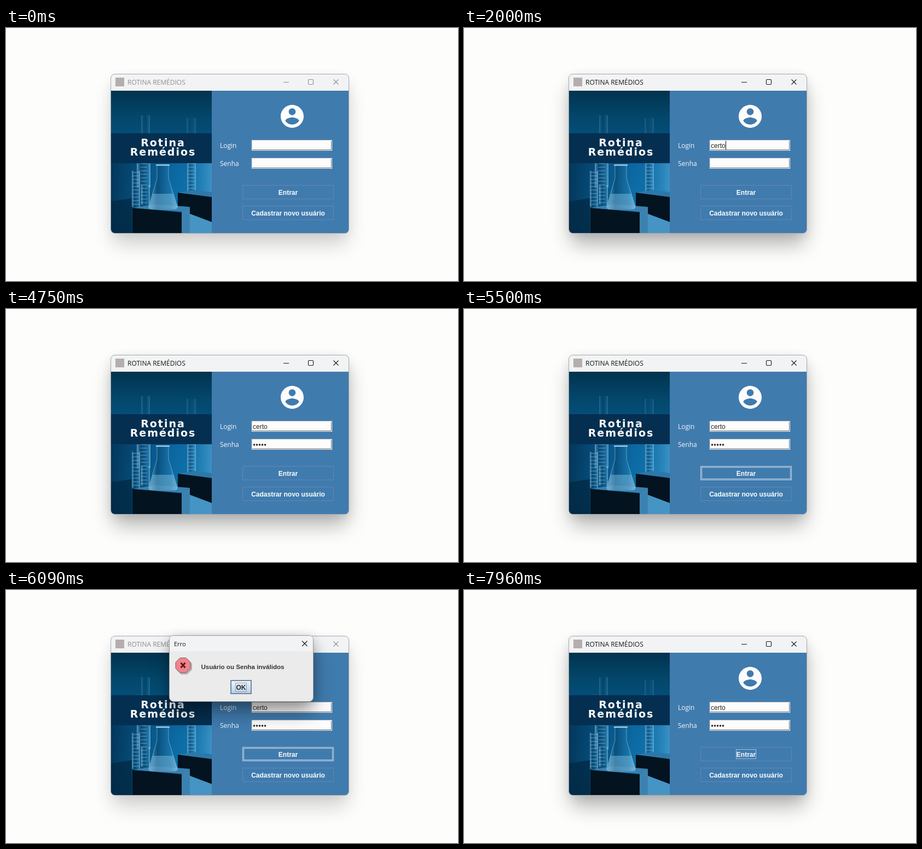
These frames come from a looping animation (826 px wide and 464 px high, 8 s). An HTML page:

```html
<!DOCTYPE html>
<html lang="pt-BR">
<head>
<meta charset="utf-8">
<title>Login</title>
<style>
html, body { margin: 0; width: 100%; height: 100%; overflow: hidden; background: #fdfdfc; }
svg { display: block; width: 100%; height: 100%; }
.ui { font: 12px "Open Sans", "Noto Sans", sans-serif; }
.field { font: 12px "Liberation Sans", Arial, sans-serif; fill: #262626; }
.bold { font: bold 12px "Liberation Sans", Arial, sans-serif; text-anchor: middle; }
.brand { font: bold 19px "DejaVu Sans", sans-serif; letter-spacing: 2px; text-anchor: middle; fill: #fdfdfd; }
.line { fill: none; stroke: currentColor; stroke-width: 1.1; }
.blur { filter: blur(18px); }
.near { filter: blur(10px); }

/* one shared 8 s timeline */
.chrome, .shade, .typed, .secret, .in-login, .in-senha, .hover, .focus, .dialog, .pressed {
  animation: 8s step-end infinite;
}
.chrome { animation-name: chrome; }
.shade { animation-name: shade; animation-timing-function: linear; }
.typed { animation-name: typed; }
.secret { animation-name: secret; }
.in-login { animation-name: in-login; }
.in-senha { animation-name: in-senha; }
.hover { animation-name: hover; }
.focus { animation-name: focus; }
.pressed { animation-name: pressed; }
.dialog { animation-name: dialog; animation-timing-function: linear; transform-origin: 368px 118.6px; }
.caret { fill: #111; animation: blink 1s step-end infinite; }

@keyframes chrome {
  0%, 70.6% { color: #8e8e8e; }
  5%, 89.6% { color: #161616; }
  100% { color: #161616; }
}
@keyframes shade {
  0%, 5%, 72%, 89.6% { opacity: .62; }
  6.5%, 70.6%, 91%, 100% { opacity: 1; }
}
@keyframes typed {
  0% { transform: none; }
  13.5% { transform: translateX(6px); }
  15.5% { transform: translateX(12.7px); }
  17.5% { transform: translateX(16.7px); }
  19.5% { transform: translateX(20px); }
  21.5%, 100% { transform: translateX(27px); }
}
@keyframes secret {
  0% { transform: none; }
  47.5% { transform: translateX(5px); }
  49.5% { transform: translateX(10px); }
  51.5% { transform: translateX(15px); }
  53.5% { transform: translateX(20px); }
  55.5%, 100% { transform: translateX(25px); }
}
@keyframes in-login {
  0%, 38% { opacity: 0; }
  5% { opacity: 1; }
  100% { opacity: 0; }
}
@keyframes in-senha {
  0%, 69.5% { opacity: 0; }
  38% { opacity: 1; }
  100% { opacity: 0; }
}
@keyframes hover {
  0%, 91.5% { opacity: 0; }
  66% { opacity: 1; }
  100% { opacity: 0; }
}
@keyframes focus {
  0%, 70.6% { opacity: 0; }
  69.5%, 89.6%, 100% { opacity: 1; }
}
@keyframes pressed {
  0%, 89.2% { opacity: 0; }
  87.4% { opacity: 1; }
  100% { opacity: 0; }
}
@keyframes dialog {
  0%, 70.6% { opacity: 0; transform: scale(.9); }
  71.9% { opacity: .84; transform: scale(.943); }
  72.8% { opacity: 1; transform: scale(.982); }
  74%, 89.4% { opacity: 1; transform: none; }
  91.6%, 100% { opacity: 0; transform: scale(.92); }
}
@keyframes blink {
  0% { opacity: 1; }
  50%, 100% { opacity: 0; }
}
</style>
</head>
<body>
<svg viewBox="0 0 826 464">
  <defs>
    <clipPath id="win"><rect x="192" y="85" width="434.5" height="291.5" rx="7"/></clipPath>
    <clipPath id="photo"><rect x="192" y="115" width="184" height="261"/></clipPath>
    <linearGradient id="wall" x2="0" y2="1">
      <stop offset="0" stop-color="#03344f"/>
      <stop offset=".2" stop-color="#045078"/>
      <stop offset=".5" stop-color="#0864a0"/>
      <stop offset=".75" stop-color="#0a6ca6"/>
      <stop offset="1" stop-color="#06507c"/>
    </linearGradient>
    <linearGradient id="side">
      <stop offset="0" stop-color="#022c4a" stop-opacity=".8"/>
      <stop offset=".4" stop-color="#022c4a" stop-opacity=".25"/>
      <stop offset=".75" stop-color="#2a90c4" stop-opacity=".15"/>
      <stop offset="1" stop-color="#55a8d4" stop-opacity=".65"/>
    </linearGradient>
    <linearGradient id="glass">
      <stop offset="0" stop-color="#94cbe8" stop-opacity=".6"/>
      <stop offset=".3" stop-color="#083f66" stop-opacity=".5"/>
      <stop offset=".75" stop-color="#2680b4" stop-opacity=".4"/>
      <stop offset="1" stop-color="#a4d6ee" stop-opacity=".6"/>
    </linearGradient>
    <linearGradient id="btn" x2="0" y2="1">
      <stop offset="0" stop-color="#f2f6fa"/>
      <stop offset="1" stop-color="#b8cfe5"/>
    </linearGradient>
    <g id="box">
      <rect width="147" height="20" fill="#fdfdfd"/>
      <path d="M0 19.5V.5H147" fill="none" stroke="#a0a8b0"/>
      <path d="M145.5 2V18.5H1" fill="none" stroke="#5c6268"/>
      <rect x="1" y="1" width="144" height="17" fill="#fdfdfd"/>
    </g>
  </defs>

  <rect width="826" height="464" fill="#fdfdfc"/>
  <g class="shade">
    <rect class="blur" x="194" y="108" width="431" height="290" rx="14" opacity=".27"/>
    <rect class="near" x="194" y="90" width="431" height="290" rx="8" opacity=".1"/>
  </g>

  <g clip-path="url(#win)">
    <rect x="191" y="84" width="437" height="32" fill="#f2f3f4"/>
    <rect x="376" y="115" width="252" height="262" fill="#407bae"/>

    <g clip-path="url(#photo)">
      <rect x="192" y="115" width="184" height="261" fill="url(#wall)"/>
      <rect x="192" y="115" width="184" height="78" fill="#02304e" opacity=".25"/>
      <rect x="192" y="248" width="184" height="128" fill="url(#side)"/>
      <g fill="url(#glass)">
        <path d="M247 160h6v33h-6zM257 160h6v33h-6z" opacity=".4"/>
        <rect x="330" y="165" width="17" height="28" opacity=".3"/>
        <rect x="239" y="248" width="25" height="44"/>
        <rect x="230" y="262" width="15" height="66"/>
        <rect x="247" y="288" width="16" height="36"/>
        <rect x="331" y="248" width="16" height="54"/>
      </g>
      <g fill="none" stroke="#9fd0ea" stroke-width="12" stroke-dasharray="1.500 5" opacity=".4">
        <path d="M237.500 264v62M252 248v74M339 248v52"/>
      </g>
      <path d="M192 318l38-6v64h-38z" fill="#022844" opacity=".75"/>
      <path d="M314 302l30-5 32 4v9z" fill="#2c78aa"/>
      <path d="M314 302l62 8v46l-62-24z" fill="#03131f"/>
      <path d="M336 341l40 15v20h-40z" fill="#4694c4"/>
      <path d="M231 330l42-7 63 5-12 9z" fill="#3880b0"/>
      <path d="M231 330l90 8v38h-90z" fill="#03131f"/>
      <path d="M321 338l15-10v48h-15z" fill="#3c82b0"/>
      <path d="M276 251h21v25l16 51q1 5-6 5h-40q-7 0-6-5l15-51z" fill="url(#glass)" stroke="#9ccfe8" stroke-opacity=".55"/>
      <path d="M268 304h38l6 24q0 3-5 3h-40q-5 0-4-4z" fill="#78b8dc" opacity=".5"/>
      <path d="M274 251.5h25" stroke="#b8dcf0" stroke-width="2"/>
      <rect x="192" y="193" width="184" height="55" fill="#052f50"/>
      <text class="brand" x="287" y="217">Rotina</text>
      <text class="brand" x="287" y="234">Remédios</text>
    </g>
  </g>
  <rect x="191.5" y="84.5" width="435" height="292" rx="7.5" fill="none" stroke="#a4a8ac"/>

  <g class="chrome">
    <rect x="200" y="91" width="16" height="16" fill="#b4aeac"/>
    <text class="ui" x="222" y="103.5" fill="currentColor">ROTINA REMÉDIOS</text>
    <path class="line" d="M507 99.5h10M598.5 94.5l9 9m0-9l-9 9"/>
    <rect class="line" x="552.5" y="94.5" width="9" height="9" rx="1.5"/>
  </g>

  <path transform="translate(497.8 136.8) scale(2.1)" fill="#fdfdfd" d="M12 2C6.48 2 2 6.48 2 12s4.48 10 10 10 10-4.48 10-10S17.52 2 12 2zm0 3c1.66 0 3 1.34 3 3s-1.34 3-3 3-3-1.34-3-3 1.34-3 3-3zm0 14.2c-2.5 0-4.71-1.28-6-3.22.03-1.99 4-3.08 6-3.08 1.99 0 5.97 1.09 6 3.08-1.29 1.94-3.5 3.22-6 3.22z"/>

  <g class="ui" fill="#f4f7fa">
    <text x="391" y="220">Login</text>
    <text x="391" y="253">Senha</text>
  </g>

  <use href="#box" x="449" y="205"/>
  <text class="field" x="451" y="220">certo</text>
  <g class="typed">
    <rect x="451" y="207" width="30" height="15" fill="#fdfdfd"/>
    <g class="in-login"><rect class="caret" x="451" y="207" width="1" height="16"/></g>
  </g>

  <use href="#box" x="449" y="238"/>
  <g fill="#262626">
    <circle cx="453.5" cy="249" r="1.8"/>
    <circle cx="458.5" cy="249" r="1.8"/>
    <circle cx="463.5" cy="249" r="1.8"/>
    <circle cx="468.5" cy="249" r="1.8"/>
    <circle cx="473.5" cy="249" r="1.8"/>
  </g>
  <g class="secret">
    <rect x="451" y="240" width="27" height="15" fill="#fdfdfd"/>
    <g class="in-senha"><rect class="caret" x="451" y="240" width="1" height="16"/></g>
  </g>

  <g fill="none" stroke="#6585b4">
    <rect x="432.5" y="288.5" width="166" height="25"/>
    <rect x="432.5" y="326.5" width="166" height="25"/>
  </g>
  <g class="hover" fill="none" stroke="#cbd8e8">
    <rect x="432.5" y="288.5" width="166" height="25"/>
    <rect x="434.5" y="290.5" width="162" height="21"/>
  </g>
  <g class="focus"><rect x="497.5" y="292.5" width="36" height="17" fill="none" stroke="#a9c0dc"/></g>
  <g class="bold" fill="#fbfcfd">
    <text x="515.5" y="306">Entrar</text>
    <text x="515.5" y="344">Cadastrar novo usuário</text>
  </g>

  <g class="dialog">
    <rect class="blur" x="300" y="104" width="261" height="120" rx="12" opacity=".36"/>
    <rect class="near" x="300" y="88" width="261" height="120" rx="8" opacity=".2"/>
    <rect x="298.5" y="83.5" width="263" height="121" rx="7.5" fill="#ebebec" stroke="#94989c"/>
    <path d="M299 112V91q0-7 7-7h248q7 0 7 7v21z" fill="#f2f3f4"/>
    <text class="ui" x="307" y="103" fill="#161616" style="font-size:11px">Erro</text>
    <path d="M541 93.5l9.5 9.5m0-9.5l-9.5 9.5" fill="none" stroke="#161616" stroke-width="1.1"/>
    <path d="M320 126h11l9 9v11l-9 9h-11l-9-9v-11z" fill="#8c8c90" opacity=".6"/>
    <path d="M318 124.500h11l8 8v11l-8 8h-11l-8-8v-11z" fill="#ea868c" stroke="#a05058"/>
    <path d="M319.500 133.500l8 9m0-9l-8 9" fill="none" stroke="#70101c" stroke-width="3"/>
    <text class="bold" x="432.5" y="145" fill="#333" style="font-size:11.6px">Usuário ou Senha inválidos</text>
    <rect x="411" y="166" width="37" height="24" fill="url(#btn)" stroke="#7088a4" stroke-width="2"/>
    <rect x="419.5" y="170.5" width="20" height="16" fill="none" stroke="#8ea4bc"/>
    <g class="pressed"><rect x="411" y="166" width="37" height="24" fill="#b4cae0" stroke="#6a8098" stroke-width="2"/></g>
    <text class="bold" x="429.5" y="183" fill="#2c2c2c">OK</text>
  </g>
</svg>
</body>
</html>
```
